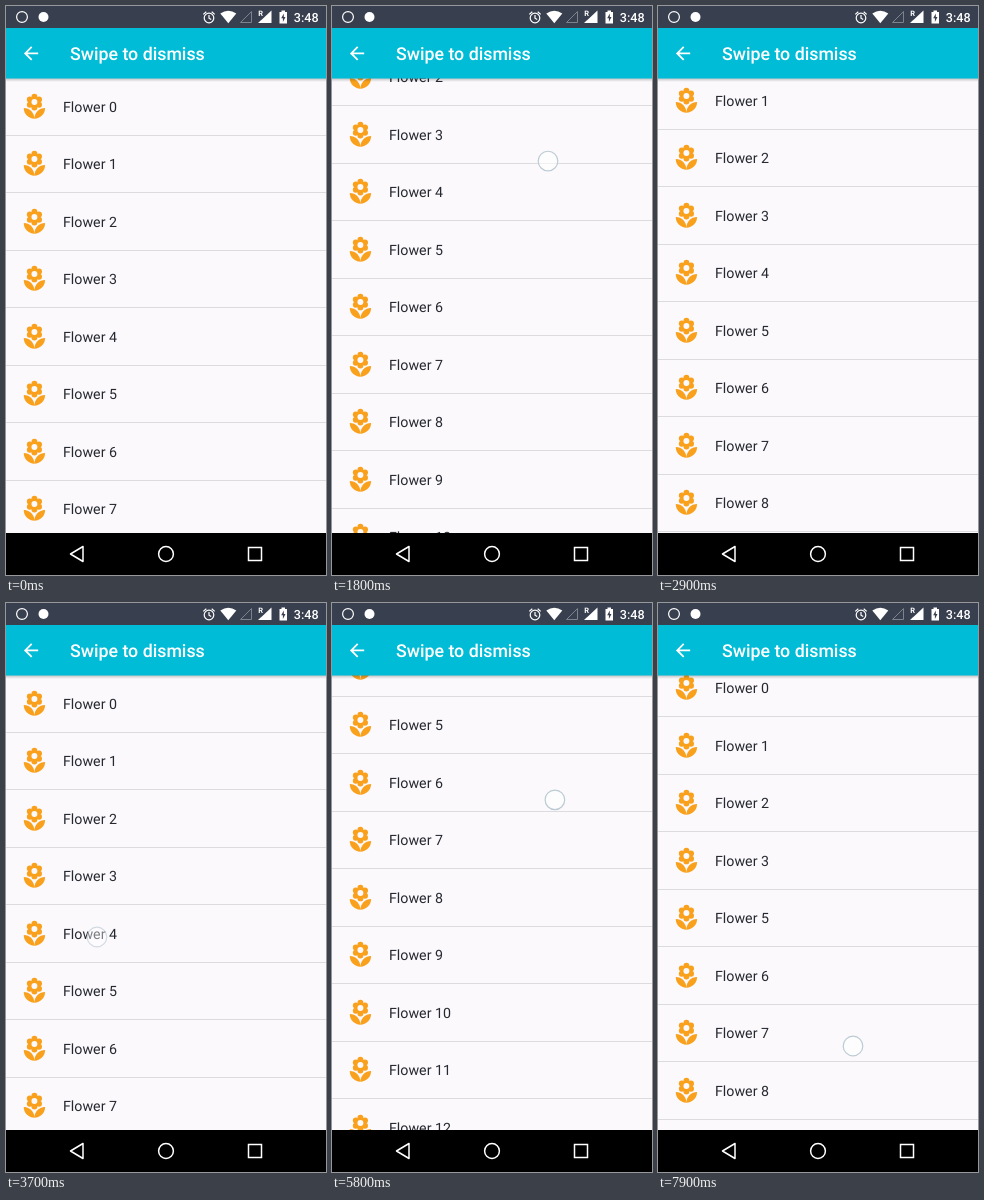
An HTML page for the animation above (8000 ms loop, 320 by 569 pixels).

```html
<!DOCTYPE html>
<html lang="en">
<head>
<meta charset="utf-8">
<title>Swipe to dismiss</title>
<style>
  html, body { margin: 0; width: 100%; height: 100%; overflow: hidden; background: #fbf9fc; }
  svg { display: block; width: 100vw; height: 100vh; }
  text { font-family: Roboto, "Noto Sans", sans-serif; text-rendering: geometricPrecision; }
  .label { font-size: 14.22px; fill: #26292f; }
  .title { font-size: 17.78px; font-weight: 500; fill: #fff; }
  .clock { font-size: 12.6px; font-weight: 500; fill: #fff; }
  .line { fill: none; stroke: #fff; stroke-width: 1.5; }
  .thin { stroke-width: 1.2; }
</style>
</head>
<body>
<svg viewBox="0 0 320 569" preserveAspectRatio="none">
  <defs>
    <linearGradient id="shade" x2="0" y2="1">
      <stop stop-color="#000" stop-opacity=".24"/>
      <stop offset="1" stop-color="#000" stop-opacity="0"/>
    </linearGradient>
    <g id="flower" fill="#f9a11d">
      <g id="petals">
        <circle cx="12" cy="3.5" r="2.5"/>
        <circle cx="8.1" cy="5.75" r="2.5"/>
        <circle cx="15.9" cy="5.75" r="2.5"/>
      </g>
      <use href="#petals" transform="matrix(1 0 0 -1 0 16)"/>
      <circle cx="12" cy="8" r="4"/>
      <circle cx="12" cy="8" r="2.5" fill="#fbf9fc"/>
      <path d="M12 22c5 0 9-4 9-9-5 0-9 4-9 9zM12 22c0-5-4-9-9-9 0 5 4 9 9 9z"/>
    </g>
  </defs>

  <rect width="320" height="569" fill="#fbf9fc"/>
  <g id="list"></g>

  <!-- app bar -->
  <rect y="72" width="320" height="4" fill="url(#shade)"/>
  <rect y="22" width="320" height="50.5" fill="#00bcd6"/>
  <path transform="translate(14.4 36.8) scale(.889)" fill="#fff"
    d="M20 11H7.83l5.59-5.59L12 4l-8 8 8 8 1.41-1.41L7.83 13H20z"/>
  <text class="title" x="64" y="54">Swipe to dismiss</text>

  <!-- status bar -->
  <rect width="320" height="22" fill="#383f4f"/>
  <circle class="line thin" cx="16" cy="11" r="5.4"/>
  <circle cx="37.5" cy="11" r="5" fill="#fff"/>
  <g class="line thin">
    <circle cx="203" cy="12" r="4.8"/>
    <path d="M203 9v3.2l2.2 1.4M197.3 8.4l3-2.6M208.7 8.4l-3-2.6"/>
  </g>
  <path d="M222.3 17.3L214.3 7.4Q222.3 2.2 230.3 7.4z" fill="#fff"/>
  <path d="M234.5 16.5H245.5V5.5z" fill="none" stroke="#7d838d"/>
  <path d="M252 17H265.500V4.500z" fill="#fff"/>
  <text x="252.3" y="9.8" font-size="7.5" font-weight="700" fill="#fff">R</text>
  <path d="M273.5 6h2V4.500h3.500V6h2v11.500h-7.500z" fill="#fff"/>
  <path d="M277.800 7.500l-2.600 4.800h1.700v3.600l2.600-4.900h-1.700z" fill="#383f4f"/>
  <text class="clock" x="287.8" y="15.8">3:48</text>

  <!-- navigation bar -->
  <rect y="527" width="320" height="42" fill="#000"/>
  <path class="line" d="M64.5 548L77 540.5V555.5z" stroke-linejoin="round"/>
  <circle class="line" cx="160" cy="548" r="7.4"/>
  <rect class="line" x="242.500" y="541.500" width="13" height="13"/>

  <circle id="finger" r="9.8" fill="#fff" fill-opacity=".6" stroke="#bccbd3" stroke-width="1.2"/>
</svg>
<script>
const LOOP = 8000, STEP = 100, WIDTH = 320, PITCH = 57.5, TOP = 72, ROWS = 20, SWIPED = 4;

const clamp = v => Math.min(1, Math.max(0, v));
const span = (t, from, to) => clamp((t - from) / (to - from));
const smooth = (t, from, to) => { const p = span(t, from, to); return p * p * (3 - 2 * p); };
const easeOut = (t, from, to) => 1 - (1 - span(t, from, to)) ** 2;

// A fling up and a drag back, then a longer drag that stops just short of the top.
const scrollAt = t => t < 5000
  ? 260 * (easeOut(t, 1600, 2200) - smooth(t, 2350, 3160))
  : 281 * smooth(t, 5400, 6000) - 265.5 * smooth(t, 6000, 6600);
const swipeAt = t => WIDTH * smooth(t, 3750, 4450);
const gapAt = t => smooth(t, 4400, 4800);

const touches = [
  { from: 1600, to: 2000, x: t => 207 + (t - 1600) * .045, y: t => 299.5 - scrollAt(t) },
  { from: 2400, to: 2900, x: t => 212 - (t - 2500) * .02, y: t => 409.5 - scrollAt(t) },
  { from: 3700, to: 4400, x: t => 91 + swipeAt(t), y: () => 334 },
  { from: 5400, to: 6600, x: t => 200 + scrollAt(t) * .11, y: t => 405 - scrollAt(t) },
  { from: 7700, to: 8200, x: () => 195, y: () => 443 }
];

const list = document.getElementById('list');
const finger = document.getElementById('finger');
list.innerHTML = Array.from({ length: ROWS }, (_, i) => `<g>
  <use href="#flower" transform="translate(14.2 14.6) scale(1.185)"/>
  <text class="label" x="57" y="34">Flower ${i}</text>
  <rect y="57" width="${WIDTH}" height="1" fill="#dcdbe0"/></g>`).join('');
const rows = [...list.children];

function draw(now) {
  const t = Math.floor(now % LOOP / STEP) * STEP;
  const scroll = scrollAt(t), swipe = swipeAt(t), gap = gapAt(t);
  rows.forEach((row, i) => {
    const slot = i > SWIPED ? i - gap : i;
    const y = Math.floor(TOP + slot * PITCH - scroll);
    row.setAttribute('transform', `translate(${i === SWIPED ? swipe : 0} ${y})`);
  });
  rows[SWIPED].setAttribute('opacity', 1 - swipe / WIDTH);

  const touch = touches.find(d => t >= d.from && t < d.to);
  finger.setAttribute('opacity', touch
    ? clamp(Math.min(t - touch.from + 100, touch.to - t) / 150) : 0);
  if (touch) finger.setAttribute('transform', `translate(${touch.x(t)} ${touch.y(t)})`);
}

const start = performance.now();
(function tick() {
  draw(performance.now() - start);
  requestAnimationFrame(tick);
})();
</script>
</body>
</html>
```
